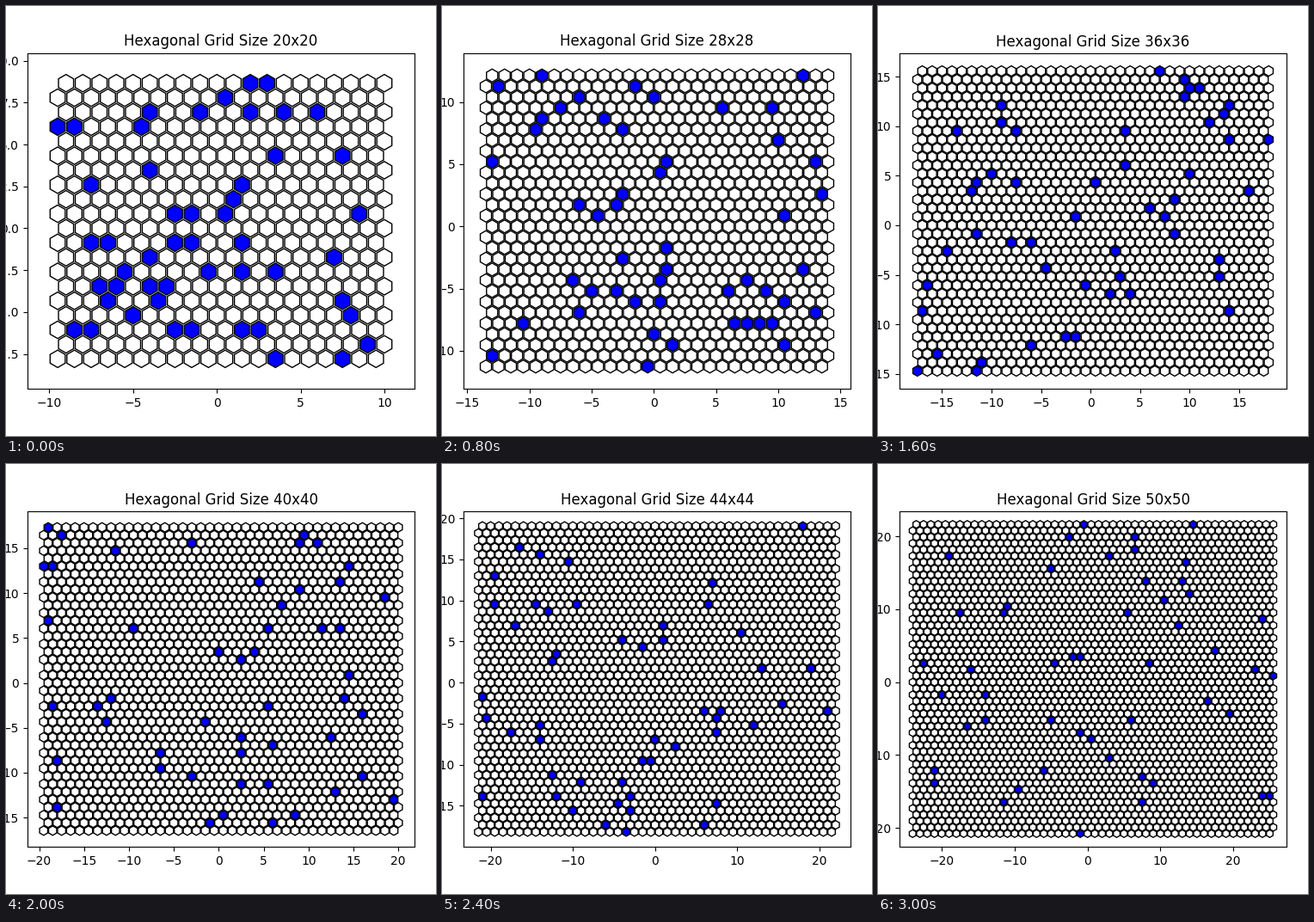
Recreate the animation shown at these times as a matplotlib script. Size 500 by 500 pixels, loop 3.1 s.

```python
import random

import matplotlib.pyplot as plt
import numpy as np
from matplotlib.animation import FuncAnimation
from matplotlib.collections import PolyCollection

FIRST, LAST = 20, 50
MARKED = 50
DIAM = 0.9


def hex_centers(n):
    """Centres of an n x n hexagonal grid with one cell at the origin."""
    half = (n + 1) // 2
    col, row = np.meshgrid(np.arange(n), np.arange(n))
    x = col + 0.5 * (row % 2) - (half - 1) - 0.5 * (half % 2 == 0)
    y = (row - (half - 1)) * np.sqrt(3) / 2
    return np.column_stack([x.ravel(), y.ravel()])


def hexagon():
    angle = np.pi / 2 + np.arange(6) * np.pi / 3
    return DIAM / np.sqrt(3) * np.column_stack([np.cos(angle), np.sin(angle)])


def draw(i):
    n = FIRST + i
    centers = hex_centers(n)
    colors = np.ones((n * n, 3))
    colors[random.Random(n).sample(range(n * n), MARKED)] = (0, 0, 1)

    ax.clear()
    ax.add_collection(PolyCollection(
        centers[:, None, :] + hexagon(), facecolors=colors,
        edgecolors="black", linewidths=1, joinstyle="miter"), autolim=False)
    (left, bottom), (right, top) = centers.min(axis=0), centers.max(axis=0)
    ax.set_xlim(left - 2 * DIAM, right + 2 * DIAM)
    ax.set_ylim(bottom - 2 * DIAM, top + 2 * DIAM)
    ax.set_aspect("equal")
    ax.set_title(f"Hexagonal Grid Size {n}x{n}")
    return []


fig = plt.figure(figsize=(5, 5), dpi=100)
ax = fig.add_axes([0.05, 0.05, 0.9, 0.9])
anim = FuncAnimation(fig, draw, frames=LAST - FIRST + 1, interval=100,
                     init_func=lambda: [], repeat=True, repeat_delay=0)
plt.show()
```
